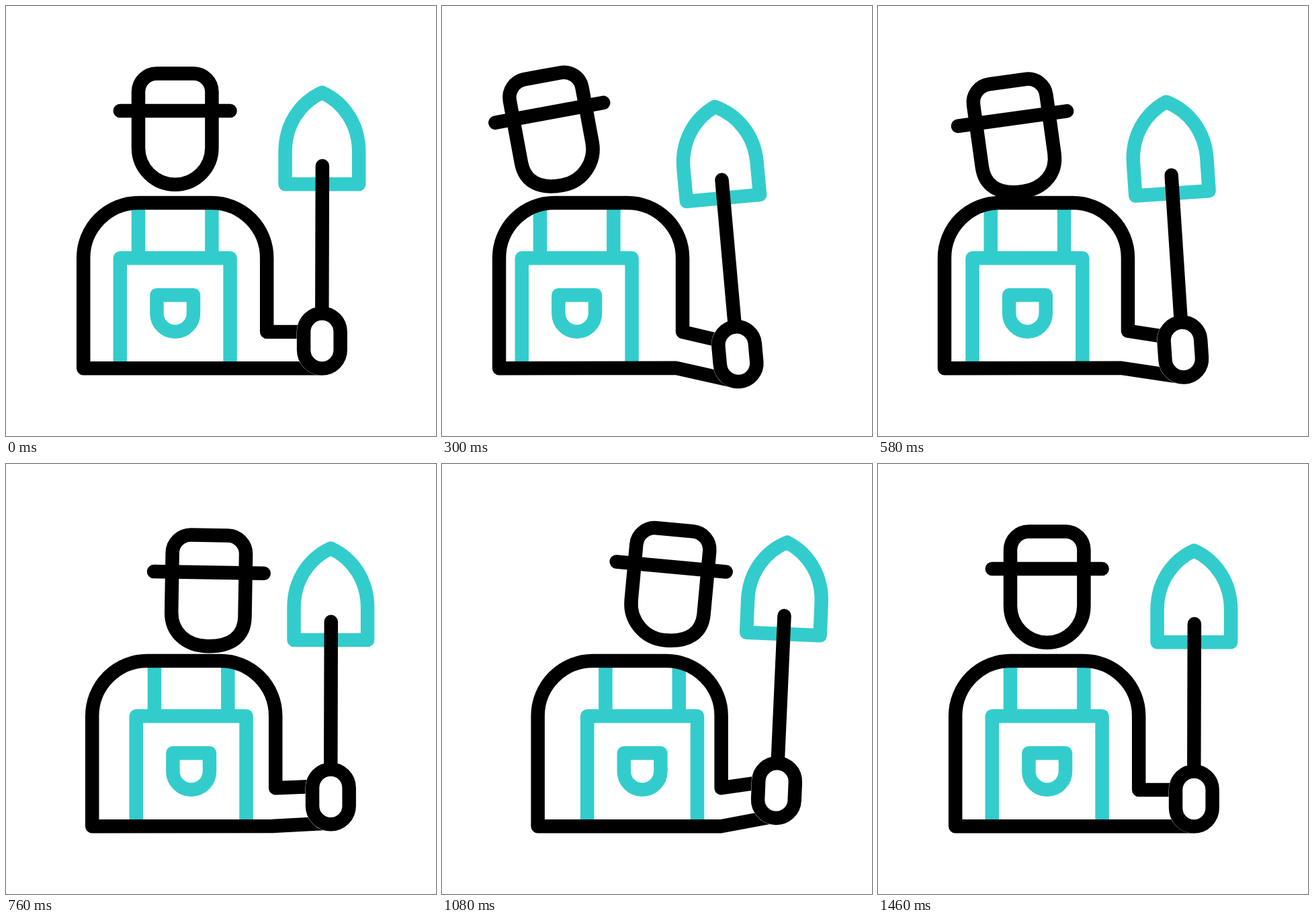
Write an HTML page with a canvas that moves like this. It is 640 px wide and 640 px high and loops after 2.4 s.

```html
<!DOCTYPE html>
<html lang="en">
<head>
<meta charset="utf-8">
<title>Gardener</title>
<style>
  html, body { margin: 0; width: 100%; height: 100%; overflow: hidden; background: #fff; }
  canvas { display: block; width: 640px; height: 640px; }
</style>
</head>
<body>
<canvas id="stage" width="640" height="640"></canvas>
<script>
const ctx = document.getElementById('stage').getContext('2d');
const BLACK = '#000', TEAL = '#33cccc', LINE = 20.5;
const LOOP = 2400, STEP = 20;
const KEYS = [0, 420, 920, 1460]; // rest, left lean, right lean, rest

const lerp = (a, b, p) => a + (b - a) * p;

// Which phase of the sway we are in, and how far through it.
function phaseAt(t) {
  if (t >= KEYS[3]) return { i: 2, p: 1 };
  const i = t < KEYS[1] ? 0 : t < KEYS[2] ? 1 : 2;
  return { i, p: (t - KEYS[i]) / (KEYS[i + 1] - KEYS[i]) };
}

// Value moving rest -> left -> right -> rest; soft blends linear with smoothstep.
function sway({ i, p }, rest, left, right, soft = 0) {
  const pose = [rest, left, right, rest];
  return lerp(pose[i], pose[i + 1], lerp(p, p * p * (3 - 2 * p), soft));
}

// The head dips along an arc while it crosses the shoulders.
function headDip({ i, p }) {
  const [depth, skew] = [[-1.9, 0], [7.7, 4.4], [-1.7, 0]][i];
  return 4 * p * (1 - p) * (depth + skew * (1 - 2 * p));
}

function stroke(color, build, width = LINE, cap = 'butt') {
  ctx.beginPath();
  build(ctx);
  ctx.strokeStyle = color;
  ctx.lineWidth = width;
  ctx.lineCap = cap;
  ctx.lineJoin = 'round';
  ctx.stroke();
}

function polyline(c, ...points) {
  points.forEach(([x, y], k) => k ? c.lineTo(x, y) : c.moveTo(x, y));
}

function placed(x, y, degrees, draw) {
  ctx.save();
  ctx.translate(x, y);
  ctx.rotate(degrees * Math.PI / 180);
  draw();
  ctx.restore();
}

function drawApron(ph) {
  placed(251.7 + sway(ph, 0, -69.3, 64, 0.25), 0, 0, () => {
    stroke(TEAL, c => {
      for (const x of [-54.7, 54.7]) polyline(c, [x, 294], [x, 375.3]);
      polyline(c, [-81.9, 539], [-81.9, 375.3], [81.9, 375.3], [81.9, 539]);
    });
    stroke(TEAL, c => {
      c.moveTo(-27.3, 430.3);
      c.lineTo(27.3, 430.3);
      c.lineTo(27.3, 457.5);
      c.arc(0, 457.5, 27.3, 0, Math.PI);
      c.closePath();
    });
  });
}

function drawBody(ph) {
  const shift = sway(ph, 0, -42.2, 39);
  const left = 115.2 + shift, right = 388.2 + shift, r = 82;
  stroke(BLACK, c => {
    c.moveTo(sway(ph, 443, 398, 484), sway(ph, 485, 502.3, 469.4));
    c.lineTo(right, sway(ph, 485, 485, 481));
    c.lineTo(right, 375);
    c.arc(right - r, 375, r, 0, -Math.PI / 2, true);
    c.arc(left + r, 375, r, -Math.PI / 2, Math.PI, true);
    c.lineTo(left, 539.3);
    c.lineTo(sway(ph, 388, 332, 426.5), sway(ph, 539.3, 538.6, 539.3));
    c.lineTo(sway(ph, 470.4, 429, 497), sway(ph, 539.3, 567.5, 519.5));
  });
}

function drawSpade(ph) {
  const x = 470.4 + sway(ph, 0, -42.8, 39.2);
  const y = 498.5 + sway(ph, 0, 27.6, -17.6);
  placed(x, y, sway(ph, 0, -7.35, 3.45), () => {
    stroke(TEAL, c => {
      c.moveTo(-54.8, -233.3);
      c.lineTo(-54.8, -281.5);
      c.bezierCurveTo(-54.8, -322, -33, -354.5, 0, -369.8);
      c.bezierCurveTo(33, -354.5, 54.8, -322, 54.8, -281.5);
      c.lineTo(54.8, -233.3);
      c.closePath();
    });
    const grip = c => c.roundRect(-27.3, -40.9, 54.6, 81.8, 27.3);
    stroke('#fff', grip, LINE + 0.6);
    ctx.fillStyle = '#fff';
    ctx.fill();
    stroke(BLACK, c => polyline(c, [0.5, -260.5], [-0.1, -41]), LINE, 'round');
    ctx.beginPath();
    grip(ctx);
    ctx.fill();
    stroke(BLACK, grip);
  });
}

// Half of the jaw; tight sharpens the corner on the side the head leans to.
function jaw(c, side, tight, upward) {
  const w = 54.7 * side;
  const startY = lerp(55, 70, tight);
  const sideY = lerp(85.2, 98, tight);
  const chinX = lerp(30.2, 38, tight) * side;
  if (upward) {
    c.bezierCurveTo(chinX, 109.7, w, sideY, w, startY);
  } else {
    c.lineTo(w, startY);
    c.bezierCurveTo(w, sideY, chinX, 109.7, 0, 109.7);
  }
}

function drawHead(ph) {
  const x = 251.7 + sway(ph, 0, -123.4, 122, 0.35);
  const y = 156 + sway(ph, 0, 5.8, -2.2, 0.35) + headDip(ph);
  placed(x, y, sway(ph, 0, -14.1, 7.2, 0.35), () => {
    stroke(BLACK, c => {
      c.moveTo(0, -55.5);
      c.arcTo(54.7, -55.5, 54.7, 0, 27.3);
      jaw(c, 1, sway(ph, 0, 0, 1), false);
      jaw(c, -1, sway(ph, 0, 1, 0), true);
      c.arcTo(-54.7, -55.5, 0, -55.5, 27.3);
      c.closePath();
    });
    stroke(BLACK, c => polyline(c, [-81.9, 0], [81.9, 0]), LINE, 'round');
  });
}

function render(now) {
  const t = Math.floor((now % LOOP) / STEP) * STEP;
  const ph = phaseAt(t);
  ctx.fillStyle = '#fff';
  ctx.fillRect(0, 0, 640, 640);
  drawApron(ph);
  drawBody(ph);
  drawSpade(ph);
  drawHead(ph);
}

let start;
function tick(now) {
  start ??= now;
  render(now - start);
  requestAnimationFrame(tick);
}
render(0);
requestAnimationFrame(tick);
</script>
</body>
</html>
```
